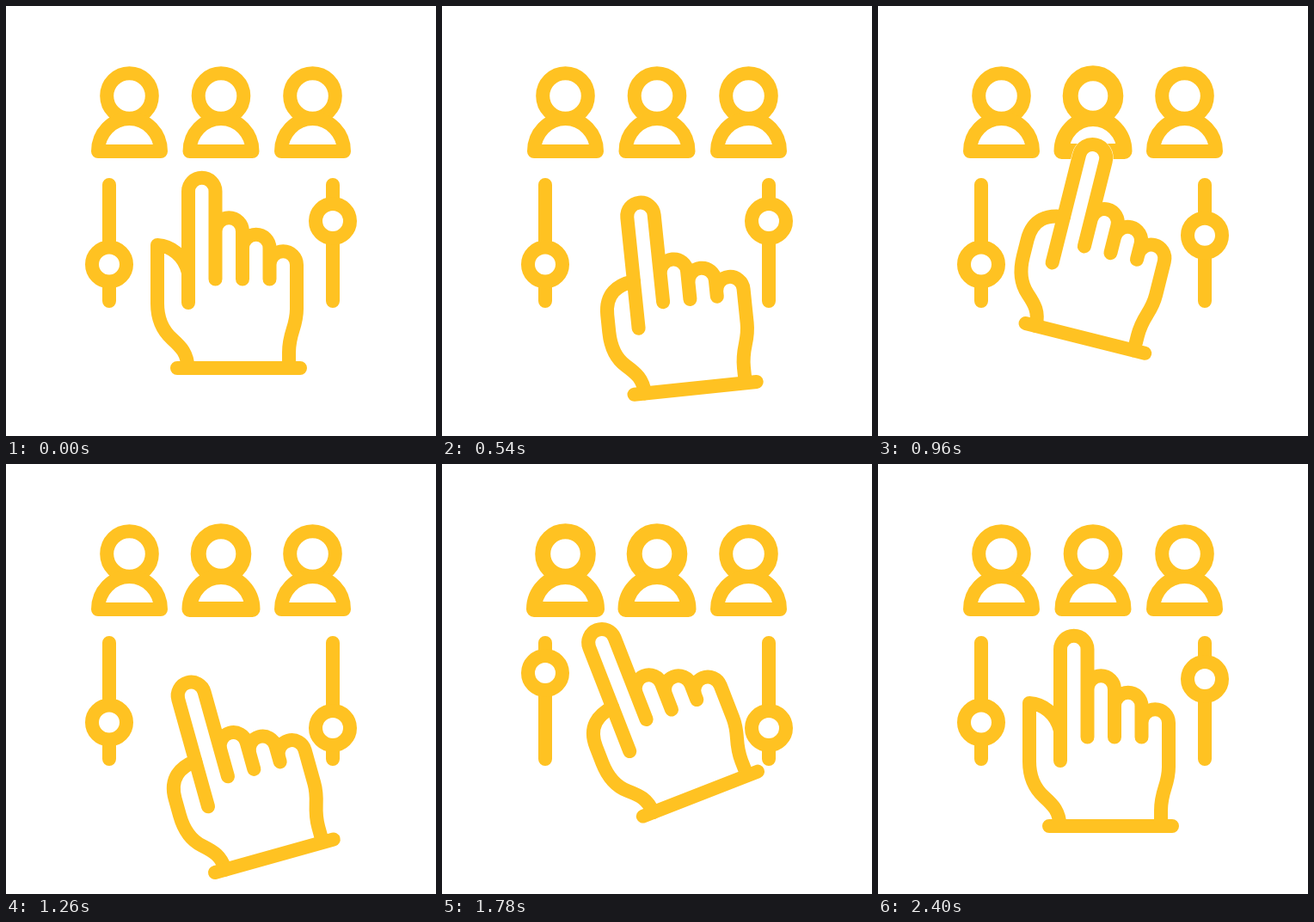
These frames come from a looping animation (500x500 px, 2.72 s). An HTML page:

```html
<!DOCTYPE html>
<html lang="en">
<head>
<meta charset="utf-8">
<title>Choosing people</title>
<style>
  html, body { margin: 0; width: 100%; height: 100%; overflow: hidden; background: #fff; }
  svg { display: block; width: 100%; height: 100%; }
  .line { fill: none; stroke: #ffc222; stroke-width: 16; stroke-linecap: round; stroke-linejoin: round; }
  .knob { fill: #fff; }
  .mask { fill: #fff; stroke: #fff; stroke-width: 16.8; stroke-linejoin: round; }
</style>
</head>
<body>
<svg viewBox="0 0 500 500">
  <defs>
    <g id="person">
      <circle cy="104.5" r="26.3"/>
      <path d="M-36.5 169A36.5 38 0 0 1 36.5 169Z"/>
    </g>
  </defs>
  <use class="line" href="#person" x="143.5" id="leftPerson"/>
  <use class="line" href="#person" x="250" id="midPerson"/>
  <use class="line" href="#person" x="356.5"/>
  <path class="line" d="M120 208V343M380 208V343"/>
  <circle class="line knob" id="leftKnob" cx="120" r="20"/>
  <circle class="line knob" id="rightKnob" cx="380" r="20"/>
  <g id="hand">
    <path class="mask" id="mask"/>
    <path class="line" id="thumb"/>
    <path class="line" id="fingers"/>
  </g>
</svg>
<script>
const LOOP = 2720, STEP = 20;
const $ = id => document.getElementById(id);
const mix = (a, b, k) => a + (b - a) * k;

function ease(t, from, to) {
  const u = Math.min(1, Math.max(0, (t - from) / (to - from)));
  return (1 - Math.cos(Math.PI * u)) / 2;
}

const pulse = (t, a, b, c, d) => ease(t, a, b) - ease(t, c, d);

// Wrist position, tilt, and how far the hand is folded into pointing
const rest = { x: 199, y: 421, tilt: 0, fold: 0 };
const point = (x, y, tilt) => ({ x, y, tilt, fold: 1 });

const moves = [
  { to: point(223.5, 451.7, -5.9), from: 280, end: 540 },
  { to: point(171.5, 369, 14.1), from: 540, end: 800 },
  { to: point(243, 475, -15.6), from: 960, end: 1240 },
  { to: point(230, 359, -30), from: 1290, end: 1500 },
  { to: point(238.5, 472, -10.6), from: 1640, end: 1940 },
  { to: rest, from: 1940, end: 2180 }
];

function pose(t) {
  const now = { ...rest };
  for (const { to, from, end } of moves) {
    const k = ease(t, from, end);
    for (const key in now) now[key] = mix(now[key], to[key], k);
  }
  return now;
}

const WIDTH = 31.5, TIP = 317.5;
const CAP = `a15.75 15.75 0 0 1 ${WIDTH} 0`;
const SIDE = 'V352C338 374 329 379 329 403V421';

function thumbPath(k) {
  const x = mix(176, 177.4, k);
  const at = (x1, y1, x2, y2) => `${mix(x1, x2, k)} ${mix(y1, y2, k)} `;
  return `M211.5 421C211 404 204 397 193 387C183 378 ${x} 364 ${x} 346V326C` +
    at(176, 310, 177.4, 301) + at(176, 295, 193, 292) + at(176, 278, 212, 290) + 'C' +
    at(192, 279, 212, 290) + at(207, 290, 212, 290) + at(212, 310, 212, 290);
}

function drawHand({ x, y, tilt, fold }) {
  let lines = `M212 345V215.5${CAP}V${TIP}`;
  let outline = `V215.5${CAP}`;
  for (let i = 0; i < 3; i++) {
    const knuckle = mix(262 + 19.5 * i, 285 + 13.5 * i, fold);
    lines += `M${243.5 + WIDTH * i} ${knuckle}${CAP}` + (i < 2 ? `V${TIP}` : SIDE);
    outline += `V${knuckle}${CAP}`;
  }
  const thumb = thumbPath(fold);
  $('thumb').setAttribute('d', thumb);
  $('fingers').setAttribute('d', lines + 'M199 421H342');
  $('mask').setAttribute('d', thumb + outline + SIDE + 'Z');
  $('hand').setAttribute('transform',
    `translate(${x} ${y}) rotate(${tilt}) translate(${-rest.x} ${-rest.y})`);
}

function draw(t) {
  drawHand(pose(t));
  $('midPerson').style.strokeWidth = 16 + 2 * pulse(t, 760, 900, 2020, 2300);
  $('leftPerson').style.strokeWidth = 16 + 2 * pulse(t, 1480, 1620, 2080, 2380);
  $('rightKnob').setAttribute('cy', 250 + 57 * pulse(t, 800, 1240, 2080, 2400));
  $('leftKnob').setAttribute('cy', 300.5 - 57.5 * pulse(t, 1480, 1770, 2080, 2400));
}

const start = performance.now();
function tick() {
  const t = (performance.now() - start) % LOOP;
  draw(Math.floor(t / STEP) * STEP);
  requestAnimationFrame(tick);
}
tick();
</script>
</body>
</html>
```
